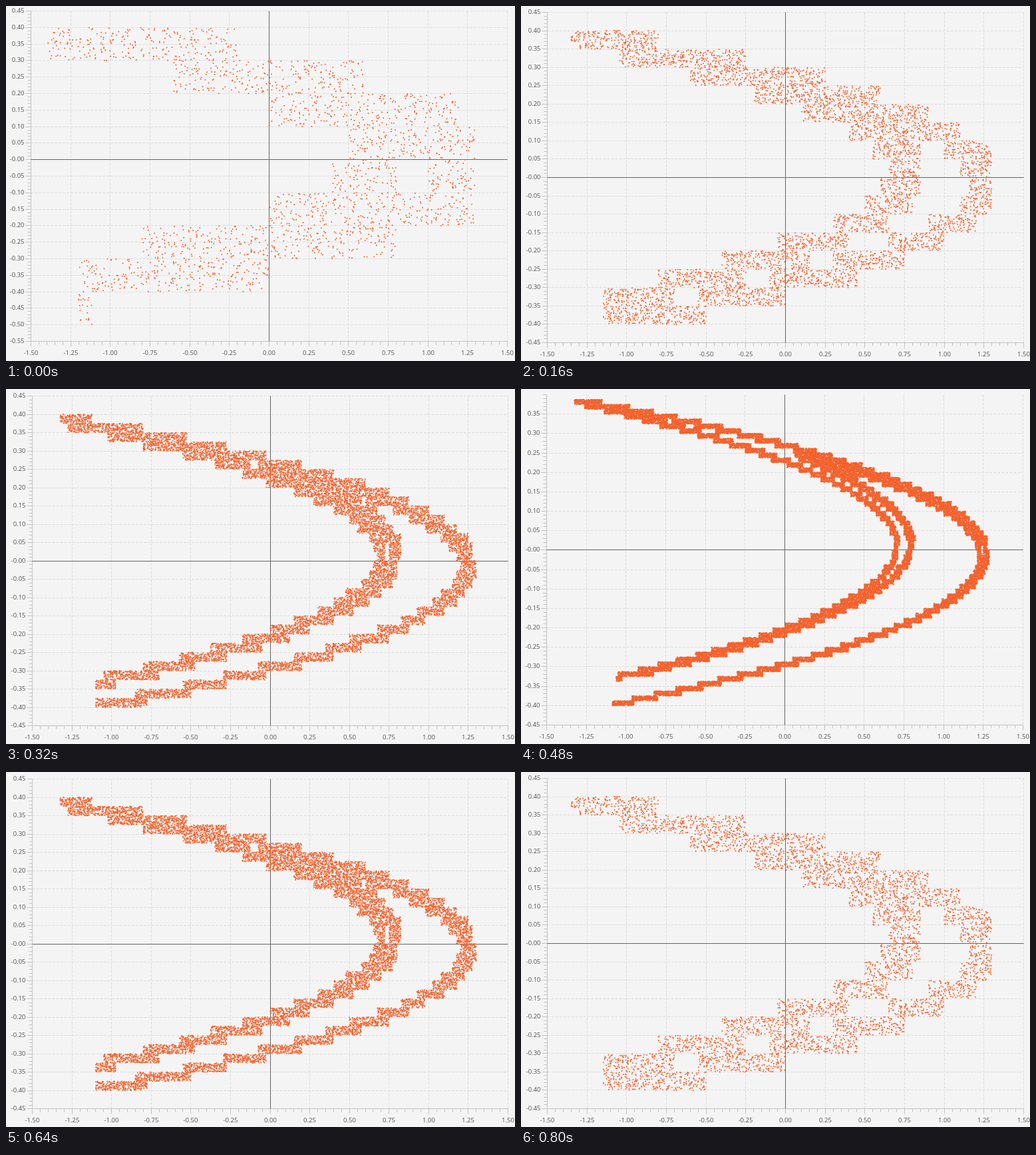
Write an HTML page with a canvas that moves like this. It is 765 px wide and 533 px high and loops after 960 ms.

```html
<!DOCTYPE html>
<html lang="en">
<head>
<meta charset="utf-8">
<title>Attractor cover refinement</title>
<style>
  html, body { margin: 0; width: 100%; height: 100%; overflow: hidden; background: #f4f4f4; }
  canvas { display: block; width: 765px; height: 533px; }
</style>
</head>
<body>
<canvas id="stage" width="765" height="533"></canvas>
<script>
const WIDTH = 765, HEIGHT = 533;
const STEP_MS = 160;
const ORDER = [0, 1, 2, 3, 2, 1];
const DOTS_PER_CELL = 22;
const SAMPLES = 8;
const FIXED_POINT = [0.631354, 0.189406];

// Plot area in pixels and the y values at its ends, one per level.
const charts = [
  { left: 37.5, right: 753.5, top: 7.5, bottom: 503.5, yMin: -0.55, yMax: 0.45, yLast: 0.45 },
  { left: 39.5, right: 755.5, top: 9.5, bottom: 505.5, yMin: -0.45, yMax: 0.45, yLast: 0.45 },
  { left: 39.5, right: 754.5, top: 10.5, bottom: 505.5, yMin: -0.45, yMax: 0.45, yLast: 0.45 },
  { left: 38.5, right: 754.5, top: 8.5, bottom: 504.5, yMin: -0.45, yMax: 0.40, yLast: 0.35 }
];

// Coarsest cover as [row, first column, end column], in cells of 0.1.
const coarseRuns = [
  [3, -14, -2], [2, -6, 6], [1, 0, 12], [0, 5, 13], [-1, 4, 8], [-1, 10, 13],
  [-2, 0, 13], [-3, -8, 8], [-4, -12, 0], [-5, -12, -11]
];

const henon = (x, y) => [1 - 1.4 * x * x + y, 0.3 * x];
const inDomain = (x, y) => x > -1.33 && x < 1.5 && Math.abs(y) < 0.4;
const pack = (col, row) => (col + 500) * 1000 + row + 500;
const unpack = key => [Math.floor(key / 1000) - 500, key % 1000 - 500];
const cellAt = ([x, y], size) => pack(Math.floor(x / size), Math.floor(y / size));

function coarseCover() {
  const cells = new Set();
  for (const [row, from, to] of coarseRuns)
    for (let col = from; col < to; col++) cells.add(pack(col, row));
  return cells;
}

// Cells hit by the image of a cell, found with a grid of sample points.
function imageCells(key, size) {
  const [col, row] = unpack(key), images = new Set();
  for (let n = 0; n < SAMPLES * SAMPLES; n++) {
    const x = (col + (n % SAMPLES + 0.5) / SAMPLES) * size;
    const y = (row + (Math.floor(n / SAMPLES) + 0.5) / SAMPLES) * size;
    const image = cellAt(henon(x, y), size);
    const [c, r] = unpack(image);
    if (inDomain((c + 0.5) * size, (r + 0.5) * size)) images.add(image);
  }
  return images;
}

function reach(start, successors) {
  const seen = new Set([start]);
  for (const key of seen)
    for (const next of successors(key)) seen.add(next);
  return seen;
}

// Keeps the cells that can be reached from the fixed point and lead back to it.
function recurrentCover(size) {
  const sources = new Map();
  const start = cellAt(FIXED_POINT, size);
  const ahead = reach(start, key => {
    const images = imageCells(key, size);
    for (const image of images) {
      if (!sources.has(image)) sources.set(image, []);
      sources.get(image).push(key);
    }
    return images;
  });
  const behind = reach(start, key => sources.get(key) || []);
  return [...ahead].filter(key => behind.has(key));
}

function seededRandom(seed) {
  return () => {
    seed = (seed + 0x6D2B79F5) | 0;
    let t = Math.imul(seed ^ (seed >>> 15), 1 | seed);
    t = (t + Math.imul(t ^ (t >>> 7), 61 | t)) ^ t;
    return ((t ^ (t >>> 14)) >>> 0) / 4294967296;
  };
}

function drawChart(ctx, chart) {
  const { left, right, top, bottom, yMin, yMax, yLast } = chart;
  const px = x => left + (x + 1.5) / 3 * (right - left);
  const py = y => bottom - (y - yMin) / (yMax - yMin) * (bottom - top);
  const crisp = v => Math.floor(v) + 0.5;

  const line = (x1, y1, x2, y2, color) => {
    ctx.strokeStyle = color;
    ctx.beginPath();
    ctx.moveTo(x1, y1);
    ctx.lineTo(x2, y2);
    ctx.stroke();
  };

  ctx.fillStyle = "#f4f4f4";
  ctx.fillRect(0, 0, WIDTH, HEIGHT);
  ctx.lineWidth = 1;
  ctx.font = '9.5px "Open Sans", "Noto Sans", sans-serif';
  ctx.textBaseline = "middle";

  const grid = "#dcdcdc", axis = "#c3c3c3", ink = "#505050";
  const yCount = Math.round((yMax - yMin) / 0.01);
  for (let n = 0; n <= yCount; n++) {
    const value = yMin + n * 0.01, y = crisp(py(value));
    const major = n % 5 === 0 && value < yLast + 0.001;
    line(left - (major ? 8 : 5), y, left, y, axis);
    if (!major) continue;
    ctx.setLineDash([4, 2]);
    line(left, y, right, y, grid);
    ctx.setLineDash([]);
    ctx.fillStyle = ink;
    ctx.textAlign = "right";
    const label = Math.abs(value) < 0.001 ? "-0.00" : value.toFixed(2);
    ctx.fillText(label, left - 10, y + 0.5);
  }
  for (let n = 0; n <= 60; n++) {
    const value = -1.5 + n * 0.05, x = crisp(px(value));
    const major = n % 5 === 0;
    line(x, bottom, x, bottom + (major ? 8 : 5), axis);
    if (!major) continue;
    ctx.setLineDash([4, 2]);
    line(x, bottom, x, top, grid);
    ctx.setLineDash([]);
    ctx.fillStyle = ink;
    ctx.textAlign = "center";
    ctx.fillText((n === 30 ? 0 : value).toFixed(2), x, bottom + 18);
  }
  line(left, top, left, bottom, axis);
  line(left, bottom, right, bottom, axis);
  line(left, crisp(py(0)), right, crisp(py(0)), "#666");
  line(crisp(px(0)), top, crisp(px(0)), bottom, "#666");
  return { px, py };
}

function drawDots(ctx, cells, size, { px, py }, seed) {
  const random = seededRandom(seed);
  ctx.fillStyle = "#f3622d";
  for (const key of cells) {
    const [col, row] = unpack(key);
    for (let n = 0; n < DOTS_PER_CELL; n++) {
      const x = px((col + random()) * size), y = py((row + random()) * size);
      ctx.beginPath();
      ctx.arc(x, y, 1, 0, 2 * Math.PI);
      ctx.fill();
    }
  }
}

const layers = charts.map((chart, level) => {
  const size = 0.1 / 2 ** level;
  const cells = level === 0 ? coarseCover() : recurrentCover(size);
  const layer = document.createElement("canvas");
  layer.width = WIDTH;
  layer.height = HEIGHT;
  const ctx = layer.getContext("2d");
  drawDots(ctx, cells, size, drawChart(ctx, chart), 11 + level);
  return layer;
});

const stage = document.getElementById("stage").getContext("2d");

function render(now) {
  const step = Math.floor(now / STEP_MS) % ORDER.length;
  stage.drawImage(layers[ORDER[step]], 0, 0);
  requestAnimationFrame(render);
}
render(0);
</script>
</body>
</html>
```
